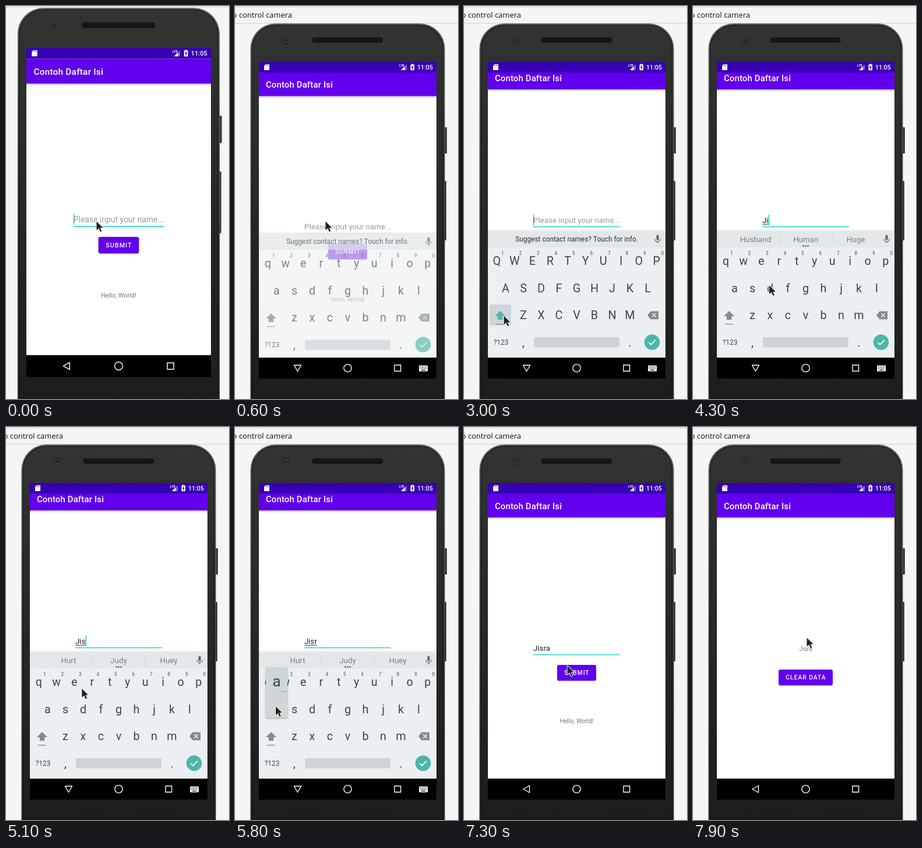
These frames come from a looping animation (383 by 674 pixels, 8 s). An HTML page with a canvas:

```html
<!DOCTYPE html>
<html lang="id">
<head>
<meta charset="utf-8">
<title>Todo demo</title>
<style>
html, body { margin: 0; width: 100%; height: 100%; overflow: hidden; background: #f5f5f5; }
canvas { display: block; }
</style>
</head>
<body>
<canvas id="stage" width="383" height="674"></canvas>
<script>
const ctx = document.getElementById('stage').getContext('2d');
const LOOP = 8000;
const APP_TITLE = 'Contoh Daftar Isi';
const PURPLE = '#6200ee', DARK_PURPLE = '#3700b3', TEAL = '#03cfbf', KEY_TEAL = '#4db6ac';
const KEY_BG = '#eceff1', KEY_INK = '#37474f', KEY_GREY = '#7f8b90', PRESSED = '#d0d5d7';
const SCREEN = { left: 41, top: 96, width: 305, height: 543, contentEnd: 603 };
const MIDDLE = SCREEN.left + SCREEN.width / 2;
const KEY_STEP = SCREEN.width / 10, ROW_STEP = 46.7, FIRST_ROW = 437;
const ROWS = ['qwertyuiop', 'asdfghjkl', 'zxcvbnm'];
const BANNER_AT = 300, HIDE_AT = 6520, OPEN_AT = 7620;
const GLIDE = 300, TAP = 130, BLINK = 1020, BLINK_ON = 440;

// Rows are centred, so each shorter row starts half a key further in.
function keyCentre(letter) {
  const row = ROWS.findIndex(keys => keys.includes(letter));
  const keys = ROWS[row];
  return {
    x: MIDDLE + (keys.indexOf(letter) - (keys.length - 1) / 2) * KEY_STEP,
    y: FIRST_ROW + row * ROW_STEP
  };
}

const spot = (at, x, y) => ({ at, x, y });
const overKey = (at, letter) => {
  const { x, y } = keyCentre(letter);
  return { at, x: x - 2, y: y - 5 };
};
const tapKey = (at, letter) => ({ ...overKey(at, letter.toLowerCase()), letter });

const SHIFT = spot(2920, 68, 531);
const STOPS = [
  spot(0, 155, 369), spot(2400, 185, 509), SHIFT,
  tapKey(3500, 'J'), tapKey(3870, 'i'), overKey(4290, 'd'),
  tapKey(4560, 's'), tapKey(5220, 'r'), tapKey(5700, 'a'),
  spot(6450, 108, 608), spot(7250, 177, 409), spot(7880, 195, 361)
];
const TAPS = STOPS.filter(stop => stop.letter);

const clamp = v => Math.min(1, Math.max(0, v));
const progress = (t, start, length) => clamp((t - start) / length);
const easeOut = (p, power) => 1 - (1 - p) ** power;
const smooth = p => p * p * (3 - 2 * p);
const tapping = (t, stop) => t >= stop.at && t < stop.at + TAP;

function rect(x, y, w, h, color, r = 0) {
  ctx.fillStyle = color;
  ctx.beginPath();
  ctx.roundRect(x, y, w, h, r);
  ctx.fill();
}

function disc(x, y, r, color) {
  ctx.fillStyle = color;
  ctx.beginPath();
  ctx.arc(x, y, r, 0, Math.PI * 2);
  ctx.fill();
}

function trace(...points) {
  ctx.beginPath();
  for (const [x, y] of points) ctx.lineTo(x, y);
}

function shape(color, ...points) {
  trace(...points);
  ctx.fillStyle = color;
  ctx.fill();
}

function stroke(color, width) {
  ctx.strokeStyle = color;
  ctx.lineWidth = width;
  ctx.stroke();
}

function dots(cols, rows, x, y, dx, dy, size, color) {
  for (let i = 0; i < cols; i++)
    for (let j = 0; j < rows; j++) rect(x + i * dx, y + j * dy, size, size, color);
}

function text(str, x, y, size, color, { align = 'left', weight = 400, spacing = 0, family = 'Roboto' } = {}) {
  ctx.font = `${weight} ${size}px "${family}", sans-serif`;
  ctx.letterSpacing = spacing + 'px';
  ctx.textAlign = align;
  ctx.fillStyle = color;
  ctx.fillText(str, x, y);
  return ctx.measureText(str).width;
}

const centred = (str, x, y, size, color, style) => text(str, x, y, size, color, { align: 'center', ...style });

function vertical(y0, y1, ...colors) {
  const gradient = ctx.createLinearGradient(0, y0, 0, y1);
  colors.forEach((color, i) => gradient.addColorStop(i / (colors.length - 1), color));
  return gradient;
}

function withState(draw) {
  ctx.save();
  draw();
  ctx.restore();
}

function clipTo(x, y, w, h, r = 0) {
  ctx.beginPath();
  ctx.roundRect(x, y, w, h, r);
  ctx.clip();
}

function drawBanner(t) {
  rect(0, 0, 383, 674, '#f5f5f5');
  rect(0, 0, 383, 1, '#fff');
  rect(0, 1, 383, 1, '#c4c4c4');
  if (t < BANNER_AT) return;
  rect(0, 29, 383, 1, '#cfcfcf');
  text('to control camera', 98, 20, 13, '#111', { align: 'right', weight: 500, family: 'Open Sans' });
}

function drawPhone() {
  rect(359, 208, 5, 45, '#3a3d3d', 1);
  rect(359, 300, 4, 102, '#3a3d3d', 1);
  const layers = [['#5d6764', '#3c4240', '#2d3030'], ['#232525', '#191a1a', '#141515'], ['#323333', '#272828', '#1c1d1d']];
  layers.forEach((colors, i) => {
    const inset = i * 2;
    rect(26.5 + inset, 30 + inset, 334 - inset * 2, 720, vertical(30, 674, ...colors), 43 - inset);
  });
  rect(132.5, 54, 121.5, 9, '#111212', 4.5);
  dots(38, 2, 136, 56, 3, 3, 1.3, '#2c2e2e');
  disc(88, 59, 6.3, '#222424');
  disc(88, 59, 4.5, '#393d3f');
  disc(88, 59, 2.3, '#191d20');
}

function drawWindow(pan) {
  const { left, top, width, height, contentEnd } = SCREEN;
  const barEnd = 155 - pan;
  rect(left, top, width, height, '#000');
  rect(left, top, width, contentEnd - top, '#fff');
  rect(left, barEnd, width, 4, vertical(barEnd, barEnd + 4, 'rgba(0,0,0,.25)', 'rgba(0,0,0,0)'));
  rect(left, 114 - pan, width, 41, PURPLE);
  text(APP_TITLE, 53, 140.5 - pan, 14.85, '#fff', { weight: 500, spacing: .18 });
  rect(left, top, width, 18, DARK_PURPLE);
}

function drawButton(label, y, w, ripple = 0) {
  const x = MIDDLE - w / 2;
  rect(x, y + 1.2, w, 27, 'rgba(0,0,0,.22)', 3);
  rect(x, y, w, 27, PURPLE, 3);
  if (ripple > 0) withState(() => {
    clipTo(x, y, w, 27, 3);
    disc(177, 411, 8 + 60 * ripple, `rgba(255,255,255,${.3 * (1 - ripple)})`);
  });
  centred(label, MIDDLE + .4, y + 17.3, 10.4, '#fff', { weight: 500, spacing: .93 });
}

function drawInput(t, y, typed, lastEdit) {
  const ink = typed ? '#1f1f1f' : '#9a9a9a';
  const width = text(typed || 'Please input your name...', 119, y, 13.35, ink);
  if (typed && t < HIDE_AT) rect(119, y + 1.7, width, 1, '#333');
  rect(119, y + 6, 149, 1.3, TEAL);
  if ((t - lastEdit) % BLINK < BLINK_ON) {
    const color = typed || t < BANNER_AT ? TEAL : '#666';
    rect(119 + (typed && width), y - 14, typed ? 1.5 : 1, 18, color);
  }
}

function drawForm(t, pan, typed, lastEdit) {
  drawWindow(pan);
  drawInput(t, 384 - pan, typed, lastEdit);
  drawButton('SUBMIT', 408 - pan, 67, progress(t, 7340, 400));
  centred('Hello, World!', MIDDLE, 508 - pan, 10.4, '#757575');
}

function drawResult(name) {
  drawWindow(0);
  centred(name, MIDDLE, 384, 10.4, '#757575');
  drawButton('CLEAR DATA', 416, 93);
}

function drawStatusIcons() {
  shape('#fff', [52.5, 100], [59, 100], [59, 110], [50, 110], [50, 102.5]);
  dots(3, 1, 52.6, 101.5, 2, 0, 1.2, DARK_PURPLE);
  text('LTE', 282, 104, 5.4, '#fff', { weight: 700 });
  shape('#8060d0', [295, 100], [295, 110], [285, 110]);
  shape('#fff', [291.5, 103.5], [291.5, 110], [285, 110]);
  rect(303.2, 99.2, 3, 2, '#fff');
  rect(301.5, 100.3, 6.5, 9.9, '#fff', .8);
  trace([305.3, 102], [303.8, 105.3], [305.8, 105.3], [304.3, 108.6]);
  stroke(DARK_PURPLE, 1.2);
  text('11:05', 313, 109, 10.6, '#fff', { weight: 500 });
}

function drawNav(keyboardShown) {
  const y = 621;
  withState(() => {
    ctx.translate(MIDDLE - 86, y);
    if (keyboardShown) ctx.rotate(-Math.PI / 2);
    ctx.lineJoin = 'round';
    trace([5, -6], [5, 6], [-5.5, 0]);
    ctx.closePath();
    stroke('#fff', 1.4);
  });
  ctx.beginPath();
  ctx.arc(MIDDLE, y, 6.6, 0, Math.PI * 2);
  stroke('#fff', 1.4);
  ctx.beginPath();
  ctx.rect(MIDDLE + 80.5, y - 5.3, 10.6, 10.6);
  stroke('#fff', 1.4);
  if (!keyboardShown) return;
  rect(316, y - 4.5, 15, 10, '#fff', 1);
  dots(5, 2, 317.7, y - 2.8, 2.5, 2.6, 1.3, '#000');
  rect(320, y + 2.7, 7, 1.3, '#000');
}

function drawSuggestions(typedCount) {
  rect(SCREEN.left, 384, SCREEN.width, 30, vertical(384, 388, '#eef0f1', '#e4e7e9'));
  if (typedCount) {
    const words = typedCount < 3 ? ['Husband', 'Human', 'Huge'] : ['Hurt', 'Judy', 'Huey'];
    words.forEach((word, i) => centred(word, MIDDLE + (i - 1) * 86, 405, 13.35, '#758087'));
    for (const side of [-1, 1]) rect(MIDDLE - .5 + side * 45.5, 392, 1, 17, '#cdd2d4');
    for (const i of [-1, 0, 1]) disc(MIDDLE + i * 4, 411.5, 1.2, KEY_INK);
  } else {
    centred('Suggest contact names? Touch for info.', MIDDLE, 404.3, 11.9, '#263238');
  }
  rect(330.3, 392.5, 4.4, 9.2, '#607078', 2.2);
  ctx.beginPath();
  ctx.arc(332.5, 399.5, 4.6, 0, Math.PI);
  stroke('#607078', 1.3);
  rect(331.8, 404, 1.4, 3, '#607078');
}

function drawSpecialKeys(t, upper) {
  const y = FIRST_ROW + ROW_STEP * 2, bottom = FIRST_ROW + ROW_STEP * 3;
  const arrow = upper ? KEY_TEAL : KEY_GREY;
  if (tapping(t, SHIFT)) rect(44, 512, 37, 36, PRESSED, 1.5);
  shape(arrow, [62, y - 7.5], [71, y + 1.5], [53, y + 1.5]);
  rect(57.8, y + 1, 8.4, 6.6, arrow);
  rect(55, 545, 13.5, 1.3, KEY_GREY);

  shape(KEY_GREY, [315, y], [320.5, y - 6.8], [334, y - 6.8], [334, y + 6.8], [320.5, y + 6.8]);
  for (const slope of [-1, 1]) {
    trace([323.2, y - 3.4 * slope], [330, y + 3.4 * slope]);
    stroke(KEY_BG, 1.5);
  }

  centred('?123', 63.5, bottom + 4, 11.9, KEY_INK);
  centred(',', 102, bottom + 7, 20, KEY_INK);
  rect(120, bottom - 9, 147, 17.5, '#cfd3d5', 2);
  centred('.', 285, bottom + 7, 20, KEY_INK);
  disc(323, bottom - .5, 13.3, KEY_TEAL);
  trace([317.3, bottom - .2], [321.2, bottom + 3.7], [329, bottom - 4.3]);
  stroke('#fff', 1.7);
}

function drawPopup(letter) {
  const { x, y } = keyCentre(letter.toLowerCase());
  withState(() => {
    ctx.shadowColor = 'rgba(0,0,0,.35)';
    ctx.shadowBlur = 3;
    ctx.shadowOffsetY = 1;
    rect(x - 18.5, y - 71, 37, 86, PRESSED, 2);
  });
  centred(letter, x, y - 39, 26.5, KEY_INK);
  dots(3, 1, x + 8, y - 31, 3.3, 0, 1.6, '#8c979c');
}

function drawKeyboard(t, typedCount) {
  const upper = t >= SHIFT.at && !typedCount;
  rect(SCREEN.left, 384, SCREEN.width, SCREEN.contentEnd - 384, KEY_BG);
  drawSuggestions(typedCount);
  for (const letter of ROWS.join('')) {
    const { x, y } = keyCentre(letter);
    centred(upper ? letter.toUpperCase() : letter, x, y + 7, 19.8, KEY_INK);
  }
  [...ROWS[0]].forEach((letter, i) =>
    centred((i + 1) % 10, keyCentre(letter).x + 10, 427, 8.2, '#66757d', { weight: 500 }));
  drawSpecialKeys(t, upper);
  const tap = TAPS.find(stop => tapping(t, stop));
  if (tap) drawPopup(tap.letter);
}

function drawScreen(t) {
  const shown = progress(t, 480, 300), hidden = progress(t, HIDE_AT, 150);
  const pan = 12 * (smooth(progress(t, 560, 300)) - smooth(progress(t, HIDE_AT, 260)));
  const done = TAPS.filter(stop => t >= stop.at + TAP);
  const typed = done.map(stop => stop.letter).join('');
  const lastEdit = done.length ? done.at(-1).at + TAP : -120;
  const keyboardShown = shown > 0 && hidden < 1;
  const { left, top, width, height, contentEnd } = SCREEN;

  clipTo(left, top, width, height);
  drawForm(t, pan, typed, lastEdit);
  if (keyboardShown) withState(() => {
    clipTo(left, top, width, contentEnd - top);
    ctx.globalAlpha = easeOut(shown, 2) * (1 - hidden);
    ctx.translate(0, 54 * ((1 - shown) ** 5 + hidden ** 2));
    drawKeyboard(t, done.length);
  });
  if (t >= OPEN_AT) withState(() => {
    ctx.globalAlpha = easeOut(progress(t, OPEN_AT, 200), 4);
    ctx.translate(0, 43 * (1 - progress(t, OPEN_AT, 350)) ** 5);
    drawResult(typed);
  });
  drawStatusIcons();
  drawNav(keyboardShown);
}

function drawPointer(t) {
  const next = STOPS.findIndex(stop => stop.at > t);
  const to = STOPS.at(next), from = next > 0 ? STOPS[next - 1] : to;
  const start = Math.max(from.at + 120, to.at - GLIDE);
  const p = smooth(progress(t, start, to.at - start));
  withState(() => {
    ctx.translate(from.x + (to.x - from.x) * p, from.y + (to.y - from.y) * p);
    trace([.5, .5], [.5, 15.5], [4.2, 12.3], [7, 18.3], [9.4, 17.2], [6.8, 11.4], [11.5, 11.2]);
    ctx.closePath();
    ctx.lineJoin = 'round';
    stroke('#fff', 1.7);
    ctx.fillStyle = '#222';
    ctx.fill();
  });
}

function render(t) {
  drawBanner(t);
  withState(() => {
    if (t < BANNER_AT) {
      const zoom = 317 / SCREEN.width;
      ctx.translate(35, 71.8);
      ctx.scale(zoom, zoom);
      ctx.translate(-SCREEN.left, -SCREEN.top);
    }
    drawPhone();
    drawScreen(t);
  });
  drawPointer(t);
}

const startTime = performance.now();
function tick() {
  render((performance.now() - startTime) % LOOP);
  requestAnimationFrame(tick);
}
tick();
</script>
</body>
</html>
```
